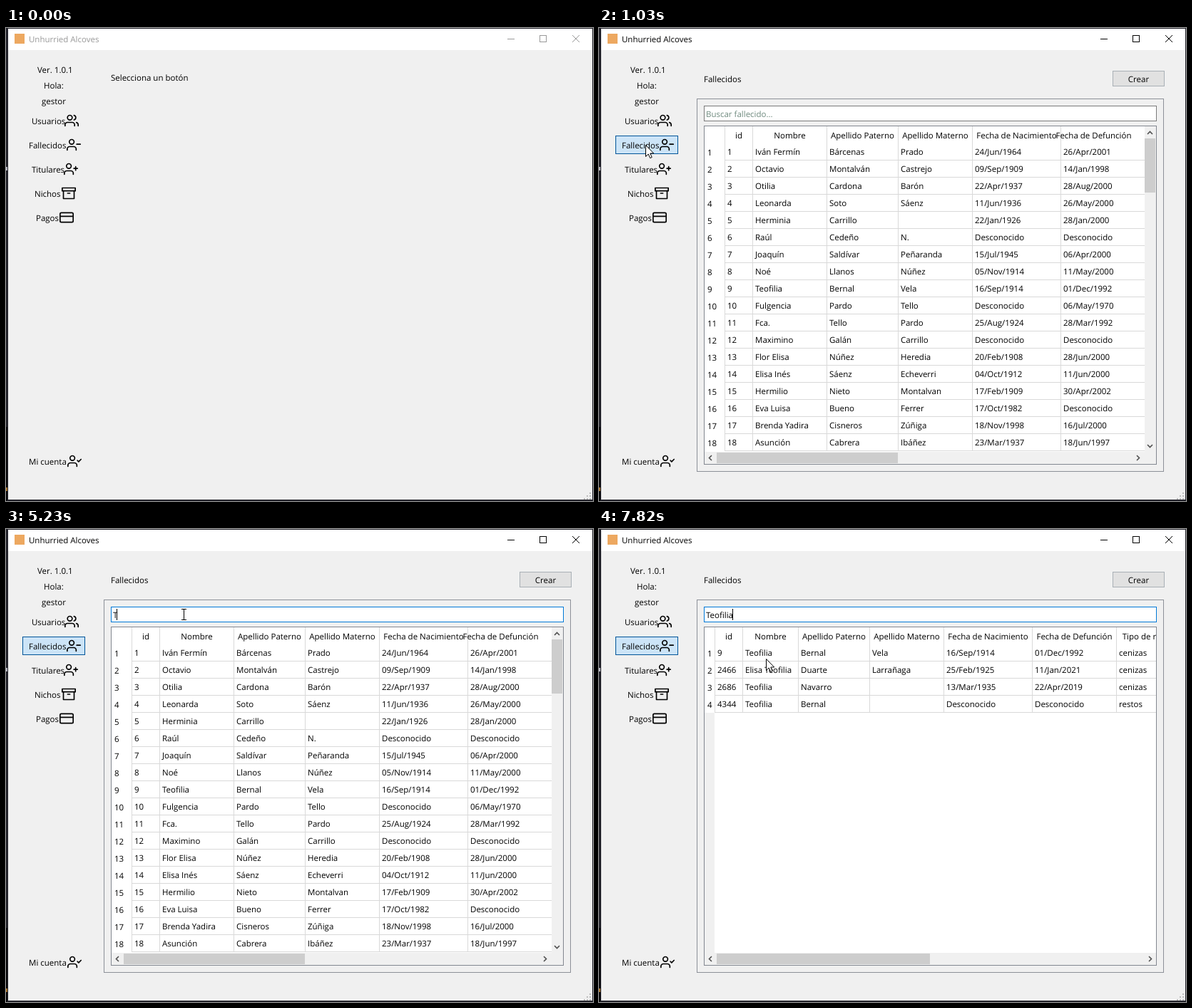
These frames come from a looping animation (823 by 664 pixels, 8 s). An HTML page:

```html
<!DOCTYPE html>
<html lang="es">
<head>
<meta charset="utf-8">
<style>
  html, body { margin: 0; width: 100%; height: 100%; overflow: hidden; }
  svg { display: block; }
  text { font: 11.5px "Open Sans", "Noto Sans", sans-serif; text-rendering: geometricPrecision; white-space: pre; }
  rect, .crisp { shape-rendering: crispEdges; }
  .icon { fill: none; stroke: #000; stroke-width: 2; stroke-linecap: round; stroke-linejoin: round; }
  .icon rect { shape-rendering: auto; }
</style>
</head>
<body>
<svg id="stage" width="823" height="664" viewBox="0 0 823 664"></svg>
<script>
const LOOP = 8000;
const SEARCH = 'Teofilia';
const GRID = '#d9d9d9';

const fill = (x, y, w, h, color) => `<rect x="${x}" y="${y}" width="${w}" height="${h}" fill="${color}"/>`;
const box = (x, y, w, h, color, border, id = '') =>
  `<rect id="${id}" x="${x + .5}" y="${y + .5}" width="${w - 1}" height="${h - 1}" fill="${color}" stroke="${border}"/>`;
const label = (x, y, text, attrs = '') => `<text x="${x}" y="${y}" ${attrs}>${text}</text>`;
const centered = (x, y, text) => label(x, y, text, 'text-anchor="middle"');
const chevron = (x, y, turn) =>
  `<path transform="translate(${x} ${y}) rotate(${turn})" d="M-3.5 2L0 -1.5L3.5 2" fill="none" stroke="#505050" stroke-width="1.6"/>`;

// Sidebar
const person = '<path d="M16 21v-2a4 4 0 0 0-4-4H5a4 4 0 0 0-4 4v2"/><circle cx="8.5" cy="7" r="4"/>';
const menu = [
  ['Usuarios', 36, 130, 82, '<path d="M17 21v-2a4 4 0 0 0-4-4H5a4 4 0 0 0-4 4v2M23 21v-2a4 4 0 0 0-3-3.87M16 3.13a4 4 0 0 1 0 7.75"/><circle cx="9" cy="7" r="4"/>'],
  ['Fallecidos', 32, 164, 85, person + '<path d="M23 11h-6"/>'],
  ['Titulares', 36, 198, 81, person + '<path d="M20 8v6M23 11h-6"/>'],
  ['Nichos', 40, 232, 78, '<path d="M21 8v13H3V8M10 12h4"/><rect x="1" y="3" width="22" height="5"/>'],
  ['Pagos', 42, 266, 75, '<rect x="1" y="4" width="22" height="16" rx="2"/><path d="M1 10h22"/>'],
  ['Mi cuenta', 32, 608, 86, person + '<path d="M17 11l2 2 4-4"/>'],
];
const menuItem = ([text, x, y, iconX, icon]) => label(x, y + 5, text) +
  `<g class="icon" transform="translate(${iconX} ${y - 10}) scale(${20 / 24})">${icon}</g>`;

// Tables
const headers = ['id', 'Nombre', 'Apellido Paterno', 'Apellido Materno', 'Fecha de Nacimiento', 'Fecha de Defunción', 'Tipo de restos'];
const parse = text => text.trim().split('\n').map(line => line.trim().split('|'));
const everyone = parse(`
  1|Iván Fermín|Bárcenas|Prado|24/Jun/1964|26/Apr/2001
  2|Octavio|Montalván|Castrejo|09/Sep/1909|14/Jan/1998
  3|Otilia|Cardona|Barón|22/Apr/1937|28/Aug/2000
  4|Leonarda|Soto|Sáenz|11/Jun/1936|26/May/2000
  5|Herminia|Carrillo||22/Jan/1926|28/Jan/2000
  6|Raúl|Cedeño|N.|Desconocido|Desconocido
  7|Joaquín|Saldívar|Peñaranda|15/Jul/1945|06/Apr/2000
  8|Noé|Llanos|Núñez|05/Nov/1914|11/May/2000
  9|Teofilia|Bernal|Vela|16/Sep/1914|01/Dec/1992
  10|Fulgencia|Pardo|Tello|Desconocido|06/May/1970
  11|Fca.|Tello|Pardo|25/Aug/1924|28/Mar/1992
  12|Maximino|Galán|Carrillo|Desconocido|Desconocido
  13|Flor Elisa|Núñez|Heredia|20/Feb/1908|28/Jun/2000
  14|Elisa Inés|Sáenz|Echeverri|04/Oct/1912|11/Jun/2000
  15|Hermilio|Nieto|Montalvan|17/Feb/1909|30/Apr/2002
  16|Eva Luisa|Bueno|Ferrer|17/Oct/1982|Desconocido
  17|Brenda Yadira|Cisneros|Zúñiga|18/Nov/1998|16/Jul/2000
  18|Asunción|Cabrera|Ibáñez|23/Mar/1937|18/Jun/1997`);
const matches = parse(`
  9|Teofilia|Bernal|Vela|16/Sep/1914|01/Dec/1992|cenizas
  2466|Elisa Teofilia|Duarte|Larrañaga|25/Feb/1925|11/Jan/2021|cenizas
  2686|Teofilia|Navarro||13/Mar/1935|22/Apr/2019|cenizas
  4344|Teofilia|Bernal||Desconocido|Desconocido|restos`);

function table(rows, edges, right) {
  const bottom = 162 + rows.length * 24;
  let out = '';
  edges.forEach((x, i) => {
    const next = edges[i + 1] || x + 92;
    out += fill(x, 138, 1, Math.min(bottom, 595) - 138, GRID) + centered((x + next) / 2 + .5, 155, headers[i]);
  });
  rows.forEach((row, r) => {
    const y = 162 + r * 24;
    out += fill(edges[0], y + 23, right - edges[0], 1, GRID) + label(152, y + 17, r + 1);
    row.forEach((cell, i) => out += label(edges[i] + 4, y + 16, cell));
  });
  return `<svg width="${right}" height="595">${out}</svg>`;
}
const horizontalBar = (right, thumbEnd) => fill(148, 595, 633, 17, '#f0f0f0') +
  fill(165, 596, thumbEnd - 165, 15, '#cdcdcd') + chevron(156, 603.5, -90) + chevron(right, 603.5, 90);
const verticalBar = fill(765, 138, 16, 457, '#f0f0f0') + fill(765, 155, 15, 76, '#cdcdcd') +
  chevron(772.5, 147, 0) + chevron(772.5, 587, 180);

const grip = [[818, 652], [814, 656], [818, 656], [810, 660], [814, 660], [818, 660]]
  .map(([x, y]) => fill(x, y, 2, 2, '#bcbcbc')).join('');

const stage = document.getElementById('stage');
stage.innerHTML = `
  ${fill(0, 0, 823, 664, '#23232b')}${fill(0, 560, 2, 104, '#08080a')}${fill(0, 195, 2, 5, '#b8b8c4')}${fill(0, 645, 2, 5, '#a8742c')}
  ${fill(3, 1, 819, 661, '#f0f0f0')}${fill(3, 1, 819, 30, '#fff')}
  ${fill(12, 8, 14, 14, '#eda860')}
  <g id="titleText">${label(32, 20, 'Unhurried Alcoves')}</g>
  <path id="titleButtons" class="crisp" d="M703 15.5h10M748.5 10.5h9v9h-9z" fill="none"/>
  <path id="close" d="M794 10L804 20M804 10L794 20" fill="none"/>
  ${box(23, 151, 88, 26, '#cce4f7', '#005499', 'button')}
  ${label(44, 63, 'Ver. 1.0.1')}${label(53, 85, 'Hola:')}${label(50, 107, 'gestor')}
  ${menu.map(menuItem).join('')}
  ${grip}
  <g id="welcome">${label(147, 74, 'Selecciona un botón')}</g>
  <g id="page">
    ${label(147, 76, 'Fallecidos')}
    ${box(720, 60, 73, 22, '#e1e1e1', '#a9b0b6')}${centered(756.5, 76, 'Crear')}
    ${box(137, 99, 655, 524, '#f0f0f0', '#8c9098')}
    ${box(147, 109, 635, 22, '#fff', '#7a7a7a', 'field')}
    <text id="query" x="150" y="125"></text>
    <rect id="caret" y="112" width="1" height="16"/>
    ${box(147, 137, 635, 476, '#fff', '#828790')}
    <g id="all">${table(everyone, [176, 215, 319, 419, 523, 647], 765)}${verticalBar}${horizontalBar(756, 419)}</g>
    <g id="found">${fill(148, 258, 14, 337, '#f0f0f0')}${table(matches, [162, 201, 279, 379, 483, 607, 725], 781)}${horizontalBar(773, 464)}</g>
  </g>
  <path id="arrow" d="M.5 .5V16.5L4.2 13L6.7 18.6L9.2 17.5L6.8 12H11.7Z" fill="#fff" stroke="#000"/>
  <path id="beam" class="crisp" d="M-3 0H4M.5 0V15M-3 15H4" fill="none" stroke="#000"/>`;

const el = Object.fromEntries([...stage.querySelectorAll('[id]')].map(node => [node.id, node]));
const show = (node, on) => node.setAttribute('display', on ? 'inline' : 'none');
const set = (node, attrs) => { for (const key in attrs) node.setAttribute(key, attrs[key]); };

// Pointer: time, x, y
const pointer = [
  [0, -50, -50], [400, 720, 640], [470, 575, 535], [540, 405, 412], [610, 245, 315], [680, 165, 256],
  [750, 112, 222], [820, 82, 182], [890, 65, 164],
  [1180, 70, 163], [1250, 88, 158], [1330, 118, 150], [1400, 155, 144], [1480, 190, 137],
  [1550, 218, 130], [1630, 238, 124], [1700, 249, 119],
  [7490, 249, 121], [7750, 241, 152], [7820, 234, 182],
];
const typing = [5230, 5500, 5630, 5830, 6030, 6230, 6360, 6490];
const blinks = [1810, 2340, 2870, 3420, 3970, 4480, 4960, 7290, 7820];

function draw(t) {
  const active = t >= 70, opened = t >= 1030, focused = t >= 1810, filtered = t >= 6760;
  const ink = active ? '#000' : '#999';
  set(el.titleText, { fill: ink });
  set(el.titleButtons, { stroke: ink });
  set(el.close, { stroke: ink });

  show(el.button, t >= 890);
  set(el.button, t < 960 ? { fill: '#e5f1fb', stroke: '#0078d7' } : { fill: '#cce4f7', stroke: '#005499' });
  show(el.welcome, !opened);
  show(el.page, opened);
  show(el.all, !filtered);
  show(el.found, filtered);

  set(el.field, { stroke: focused ? '#0078d7' : '#7a7a7a' });
  const typed = SEARCH.slice(0, typing.filter(time => time <= t).length);
  el.query.textContent = typed || 'Buscar fallecido...';
  set(el.query, { fill: typed ? '#000' : '#6f8a7e' });
  set(el.caret, { x: typed ? Math.round(149 + el.query.getComputedTextLength()) : 150 });
  show(el.caret, blinks.filter(time => time <= t).length % 2);

  const [, x, y] = pointer.findLast(([time]) => time <= t);
  const overField = opened && x > 147 && y > 109 && y < 131;
  show(el.arrow, !overField);
  show(el.beam, overField);
  set(el.arrow, { transform: `translate(${x} ${y})` });
  set(el.beam, { transform: `translate(${x} ${y - 6.5})` });
}

function tick() {
  draw(performance.now() % LOOP);
  requestAnimationFrame(tick);
}
tick();
</script>
</body>
</html>
```
